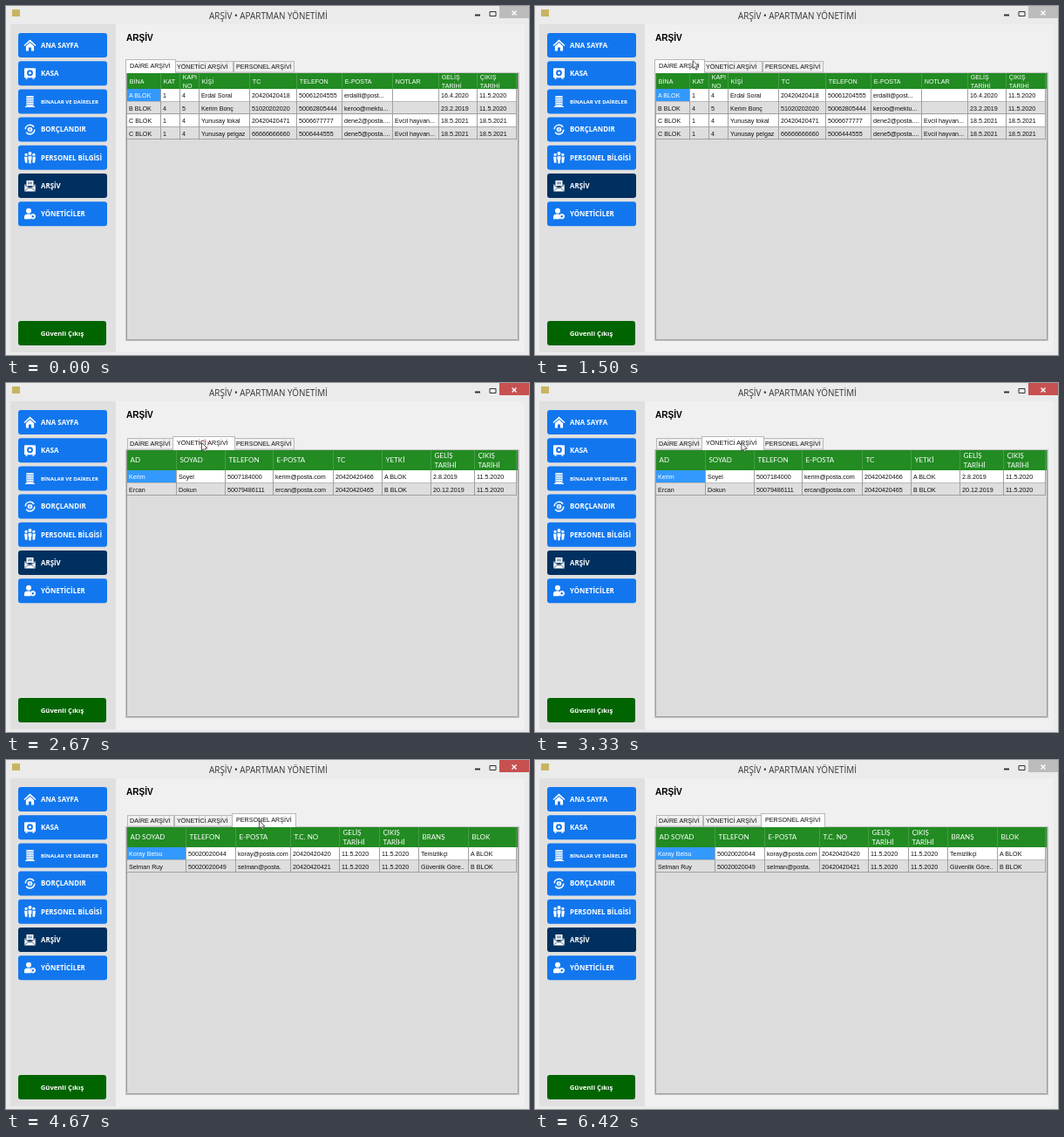
These frames come from a looping animation (600x400 px, 6510 ms). An HTML page:

```html
<!DOCTYPE html>
<html lang="tr">
<head>
<meta charset="utf-8">
<title>Arşiv</title>
<style>
html, body { margin: 0; width: 100%; height: 100%; overflow: hidden; background: #ebebeb; }
svg { display: block; }
text { white-space: pre; }
.ui { font-family: "Open Sans", sans-serif; }
.grid { font: 7.15px "Liberation Sans", Arial, sans-serif; }
.wide { font: 8px Lato, sans-serif; }
</style>
</head>
<body>
<svg id="stage" width="600" height="400" viewBox="0 0 600 400"></svg>
<script>
const LOOP = 6510;
const stage = document.getElementById('stage');

const rect = (x, y, w, h, fill, more = '') =>
  `<rect x="${x}" y="${y}" width="${w}" height="${h}" fill="${fill}" ${more}/>`;
const text = (x, y, s, cls, fill = '#111', more = '') =>
  `<text x="${x}" y="${y}" class="${cls}" fill="${fill}" ${more}>${s}</text>`;
const line = (d, color, width = 1) =>
  `<path d="${d}" fill="none" stroke="${color}" stroke-width="${width}"/>`;

// Icons are drawn in a 14 x 14 box, white on the button colour
const icons = {
  home: c => '<path d="M0 7 7 .5 14 7 13 8 7 2.7 1 8z"/><path d="M2.4 8 7 4l4.6 4v5.5H8.500V9.500h-3v4H2.400z"/>',
  safe: c => `<rect x=".5" y="1" width="13" height="11" rx="1"/><path d="M2 12h2v1.500H2zm8 0h2v1.500h-2z"/>
    <circle cx="7" cy="6.500" r="3.400" fill="${c}"/><circle cx="7" cy="6.500" r="1.500"/>`,
  building: c => `<path d="M3 .5h8V13H3zM1.500 12.500h11v1h-11z"/>
    <path d="M4 3h6M4 5.500h6M4 8h6M4 10.500h6" stroke="${c}" stroke-width="1.200" stroke-dasharray="1.400 .9"/>`,
  debt: c => `<circle cx="7" cy="7" r="5.300" fill="none" stroke="#fff" stroke-width="1.600" stroke-dasharray="13 3.650"/>
    <circle cx="7" cy="7" r="2.800"/><path d="M6 5.500h2M6 7h2M6 8.500h2" stroke="${c}" stroke-width=".7"/>`,
  people: c => `<circle cx="2.600" cy="3.500" r="1.600"/><circle cx="11.400" cy="3.500" r="1.600"/>
    <path d="M.5 6h3.500v7H1.500zM10 6h3.500l-1 7H10z"/><circle cx="7" cy="2.300" r="2"/>
    <path d="M4.700 5h4.600v4.500H8.500V14h-3V9.500h-.8z" stroke="${c}" stroke-width=".6"/>`,
  archive: c => `<path d="M3 1h8v6H3zM.8 5 7 9.500 13.200 5v8.500H.8z"/>
    <path d="M4.500 3h5M4.500 4.800h5M.8 6 7 10.300 13.200 6M1 13l4.500-4M13 13 8.500 9" stroke="${c}" stroke-width=".7" fill="none"/>`,
  manager: c => `<circle cx="5.500" cy="3.500" r="3"/><path d="M.5 13V9.500Q1 7.300 4 7.300h3.500L8 13z"/>
    <circle cx="10.300" cy="10" r="2.700" stroke="#fff" stroke-width="1.300" stroke-dasharray="1.300 .82"/>
    <circle cx="10.300" cy="10" r="1.200" fill="${c}"/>`
};

const menu = [
  ['home', 'ANA SAYFA'], ['safe', 'KASA'], ['building', 'BİNALAR VE DAİRELER', 6.05],
  ['debt', 'BORÇLANDIR'], ['people', 'PERSONEL BİLGİSİ'], ['archive', 'ARŞİV'], ['manager', 'YÖNETİCİLER']
];

function sidebar() {
  const buttons = menu.map(([icon, label, size = 7.9], i) => {
    const y = 31 + i * 32.2, fill = icon === 'archive' ? '#00305f' : '#1277ee';
    return rect(14, y, 102, 28, fill, 'rx="3"') +
      `<g transform="translate(20.500 ${y + 7})" fill="#fff">${icons[icon](fill)}</g>` +
      text(40, y + 14 + size * 0.36, label, 'ui', '#fff', `font-size="${size}" font-weight="700"`);
  });
  return rect(5, 21, 121, 376, '#e0e0e0') + buttons.join('') +
    rect(14, 361, 101, 28, '#006400', 'rx="3"') +
    text(64.5, 377.5, 'Güvenli Çıkış', 'ui', '#fff', 'font-size="7.700" font-weight="700" text-anchor="middle"');
}

function titleBar() {
  return rect(7, 4, 9, 8, '#c8b560') +
    text(301, 14.5, 'ARŞİV • APARTMAN YÖNETİMİ', 'ui', '#333', 'font-size="9.900" text-anchor="middle"') +
    rect(538, 9.5, 6, 2, '#333') +
    line('M555 6.500h7v5h-7z', '#333') +
    rect(566, 0, 34, 14, '#bcbcbc', 'id="close"') +
    line('M580.500 5.500l5 5m0-5l-5 5', '#fff', 1.4);
}

const dates = ['GELİŞ/TARİHİ', 'ÇIKIŞ/TARİHİ'];
const tables = [
  {
    cols: [139, 178, 200, 222, 280, 334, 386, 444, 497, 541, 586],
    head: ['BİNA', 'KAT', 'KAPI/NO', 'KİŞİ', 'TC', 'TELEFON', 'E-POSTA', 'NOTLAR', ...dates],
    font: 'grid', top: 95, gap: 9.5,
    rows: [
      'A BLOK|1|4|Erdal Soral|20420420418|50061204555|erdalll@post...||16.4.2020|11.5.2020',
      'B BLOK|4|5|Kerim Bonç|51020202020|50062805444|keroo@mektu...||23.2.2019|11.5.2020',
      'C BLOK|1|4|Yunusay tokal|20420420471|5006677777|dene2@posta....|Evcil hayvan...|18.5.2021|18.5.2021',
      'C BLOK|1|4|Yunusay pelgaz|66666666660|5006444555|dene5@posta....|Evcil hayvan...|18.5.2021|18.5.2021'
    ]
  },
  {
    cols: [139, 196, 252, 307, 376, 432, 488, 538, 586],
    head: ['AD', 'SOYAD', 'TELEFON', 'E-POSTA', 'TC', 'YETKİ', ...dates],
    font: 'wide', top: 100, gap: 11.5,
    rows: [
      'Kerim|Soyel|5007184000|kerim@posta.com|20420420466|A BLOK|2.8.2019|11.5.2020',
      'Ercan|Dokun|50079486111|ercan@posta.com|20420420465|B BLOK|20.12.2019|11.5.2020'
    ]
  },
  {
    cols: [139, 207, 264, 327, 383, 429, 474, 531, 586],
    head: ['AD SOYAD', 'TELEFON', 'E-POSTA', 'T.C. NO', ...dates, 'BRANŞ', 'BLOK'],
    font: 'wide', top: 100, gap: 11.5,
    rows: [
      'Koray Belsu|50020020044|koray@posta.com|20420420420|11.5.2020|11.5.2020|Temizlikçi|A BLOK',
      'Selman Ruy|50020020049|selman@posta.|20420420421|11.5.2020|11.5.2020|Güvenlik Göre..|B BLOK'
    ]
  }
];

function table({ cols, head, font, top, gap, rows }) {
  const rowH = 14.6, mid = (77 + top) / 2, bottom = top + rows.length * rowH;
  let out = rect(139, 77, 448, top - 77, '#228b22');
  head.forEach((label, i) => {
    const parts = label.split('/'), pad = font === 'wide' ? 3.5 : 2.8;
    parts.forEach((s, k) => {
      const y = mid + 2.8 + (k - (parts.length - 1) / 2) * gap;
      out += text(cols[i] + pad, y, s, font, '#fff');
    });
  });
  rows.forEach((row, r) => {
    const y = top + r * rowH;
    out += rect(139, y, 447, rowH, r % 2 ? '#dedede' : '#fff');
    if (!r) out += rect(139, y, cols[1] - 139, rowH, '#3399ff');
    row.split('|').forEach((s, i) => {
      out += text(cols[i] + 2, y + 10, s, 'grid', r || i ? '#111' : '#fff');
    });
    out += line(`M139 ${Math.round(y + rowH) - 0.5}H586`, '#a0a0a0');
  });
  cols.slice(1).forEach(x => {
    out += line(`M${x - 0.5} 77V${top}`, '#5fa95f', 0.6) + line(`M${x - 0.5} ${top}V${bottom}`, '#a0a0a0');
  });
  return `<g class="table">${out}</g>`;
}

const tabs = [[139, 193, 'DAİRE ARŞİVİ'], [193, 261, 'YÖNETİCİ ARŞİVİ'], [261, 331, 'PERSONEL ARŞİVİ']];

function tabStrip(selected, hovered) {
  const draw = ([a, b, label], i) => {
    const on = i === selected, hot = i === hovered && !on;
    const [x, y, w, h] = on ? [a - 1.5, 61.5, b - a + 3, 15.5] : [a + 0.5, 63.5, b - a - 1, 12.5];
    return rect(x, y, w, h, on ? '#fff' : hot ? '#e0effc' : '#f0f0f0', `stroke="${hot ? '#7eb4ea' : '#b8b8b8'}"`) +
      (on ? rect(x + 0.5, 75.5, w - 1, 2, '#fff') : '') +
      text(a + 3, on ? 71.3 : 72.3, label, 'grid');
  };
  const order = [0, 1, 2].filter(i => i !== selected).concat(selected);
  return order.map(i => draw(tabs[i], i)).join('');
}

stage.innerHTML =
  rect(0, 0, 600, 400, '#ebebeb') + titleBar() +
  rect(126, 21, 469, 376, '#f0f0f0') + sidebar() +
  text(138, 40.3, 'ARŞİV', '', '#000', 'font-family="Liberation Sans, Arial, sans-serif" font-size="10.100" font-weight="700"') +
  rect(137.5, 76.5, 451, 307, '#fff', 'stroke="#c4c4c4"') +
  '<g id="tabs"></g>' +
  rect(139, 77, 448, 305, '#dcdcdc') + line('M138.500 77V382.500H587.500V77', '#9c9c9c') +
  tables.map(table).join('') +
  `<g id="cursor"><circle id="ring" cx="3" cy="2.500" r="5" fill="none" stroke="#e06060" stroke-opacity=".5"/>
   <path d="M.5 .5V9.500L2.600 7.600 4.200 11 5.700 10.300 4.200 7H7z" fill="#fff" stroke="#333" stroke-width=".8"/></g>`;

const $ = id => document.getElementById(id);
const tableNodes = document.querySelectorAll('.table');

// Pointer stops: time, x, y
const path = [
  [450, 330, -14], [830, 245, 47], [1080, 245, 47], [1700, 160, 67], [2250, 160, 67],
  [2560, 224, 68], [3170, 224, 68], [3750, 290, 69], [5500, 290, 69], [5740, 420, -14]
];
const clicks = [1880, 2590, 4170];

function pointer(t) {
  const i = path.findIndex(p => p[0] > t);
  if (i <= 0) return [-50, -50];
  const [t0, x0, y0] = path[i - 1], [t1, x1, y1] = path[i];
  const u = (t - t0) / (t1 - t0), e = u * u * (3 - 2 * u);
  return [x0 + (x1 - x0) * e, y0 + (y1 - y0) * e];
}

let lastTabs = '';
function draw(now) {
  const t = now % LOOP, [x, y] = pointer(t);
  const selected = t < clicks[1] ? 0 : t < clicks[2] ? 1 : 2;
  const hovered = y > 62 && y < 77 ? tabs.findIndex(([a, b]) => x >= a && x < b) : -1;
  const key = selected + ',' + hovered;
  if (key !== lastTabs) {
    $('tabs').innerHTML = tabStrip(selected, hovered);
    tableNodes.forEach((n, i) => n.setAttribute('display', i === selected ? 'inline' : 'none'));
    lastTabs = key;
  }
  $('close').setAttribute('fill', t >= clicks[0] && t < 6170 ? '#c75050' : '#bcbcbc');
  $('cursor').setAttribute('transform', `translate(${x} ${y})`);
  $('ring').setAttribute('opacity', clicks.some(c => t >= c && t < c + 170) ? 1 : 0);
  requestAnimationFrame(draw);
}
draw(performance.now());
</script>
</body>
</html>
```
